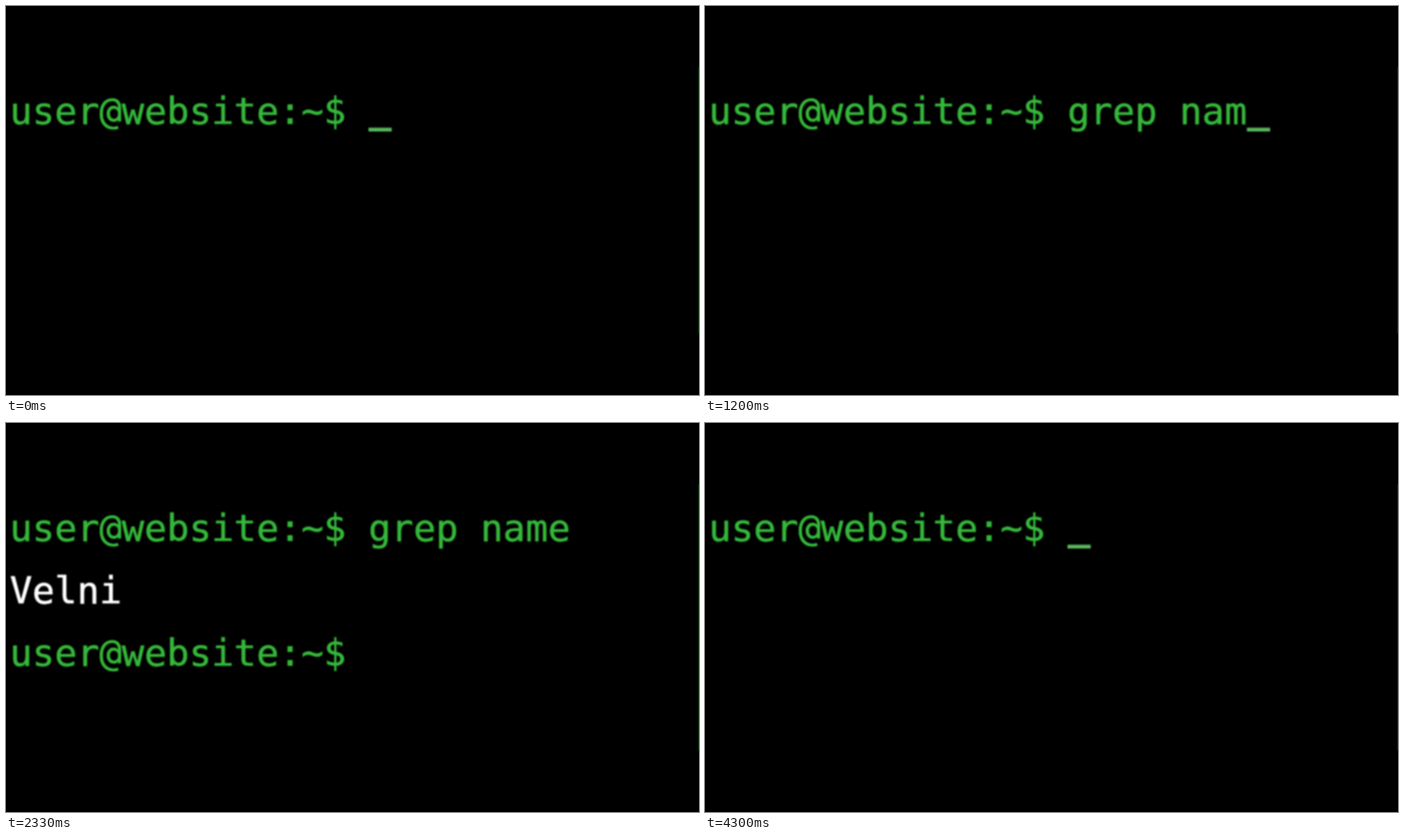
Write an HTML page that moves like this. It is 998 px wide and 561 px high and loops after 4330 ms.

```html
<!DOCTYPE html>
<html lang="en">
<head>
<meta charset="utf-8">
<title>Terminal</title>
<style>
  html, body { margin: 0; width: 100%; height: 100%; overflow: hidden; background: #000; }
  svg { display: block; width: 100%; height: 100%; }
  text {
    font: 53.65px "DejaVu Sans Mono", monospace; white-space: pre;
    fill: #35b83a; stroke: #35b83a; stroke-width: .7px;
  }
  #screen { filter: blur(.8px); }
  #name { fill: #fff; stroke: #fff; }
  #cursor { fill: #58b65a; }
</style>
</head>
<body>
<svg viewBox="0 0 998 561">
  <g id="screen">
    <text id="line" x="5.4" y="170"></text>
    <g id="output">
      <text id="name" x="5.4" y="260">Velni</text>
      <text id="next" x="5.4" y="350"></text>
    </g>
    <rect id="cursor" y="175.5" width="33.5" height="5.5"/>
  </g>
  <rect x="997" y="88" width="1" height="384" fill="#083d0b"/>
</svg>
<script>
const LOOP = 4330, TYPE_START = 320, KEY_TIME = 100;
const ENTER = 1440, OUTPUT = 1570, RESET = 3400;
const LEFT = 5.2, CELL = 32.3;
const PROMPT = "user@website:~$ ", COMMAND = "grep name ";

const get = id => document.getElementById(id);
const line = get("line"), output = get("output"), cursor = get("cursor");
const show = (el, on) => el.setAttribute("visibility", on ? "visible" : "hidden");
get("next").textContent = PROMPT;

function draw(t) {
  const keys = Math.floor((t - TYPE_START) / KEY_TIME);
  const typed = t >= RESET ? 0 : Math.max(0, Math.min(COMMAND.length, keys));
  line.textContent = PROMPT + COMMAND.slice(0, typed);
  cursor.setAttribute("x", LEFT + (PROMPT.length + typed) * CELL);
  show(cursor, t < ENTER || t >= RESET);
  show(output, t >= OUTPUT && t < RESET);
}

const start = performance.now();
function frame(now) {
  draw(Math.max(0, now - start) % LOOP);
  requestAnimationFrame(frame);
}
draw(0);
requestAnimationFrame(frame);
</script>
</body>
</html>
```
